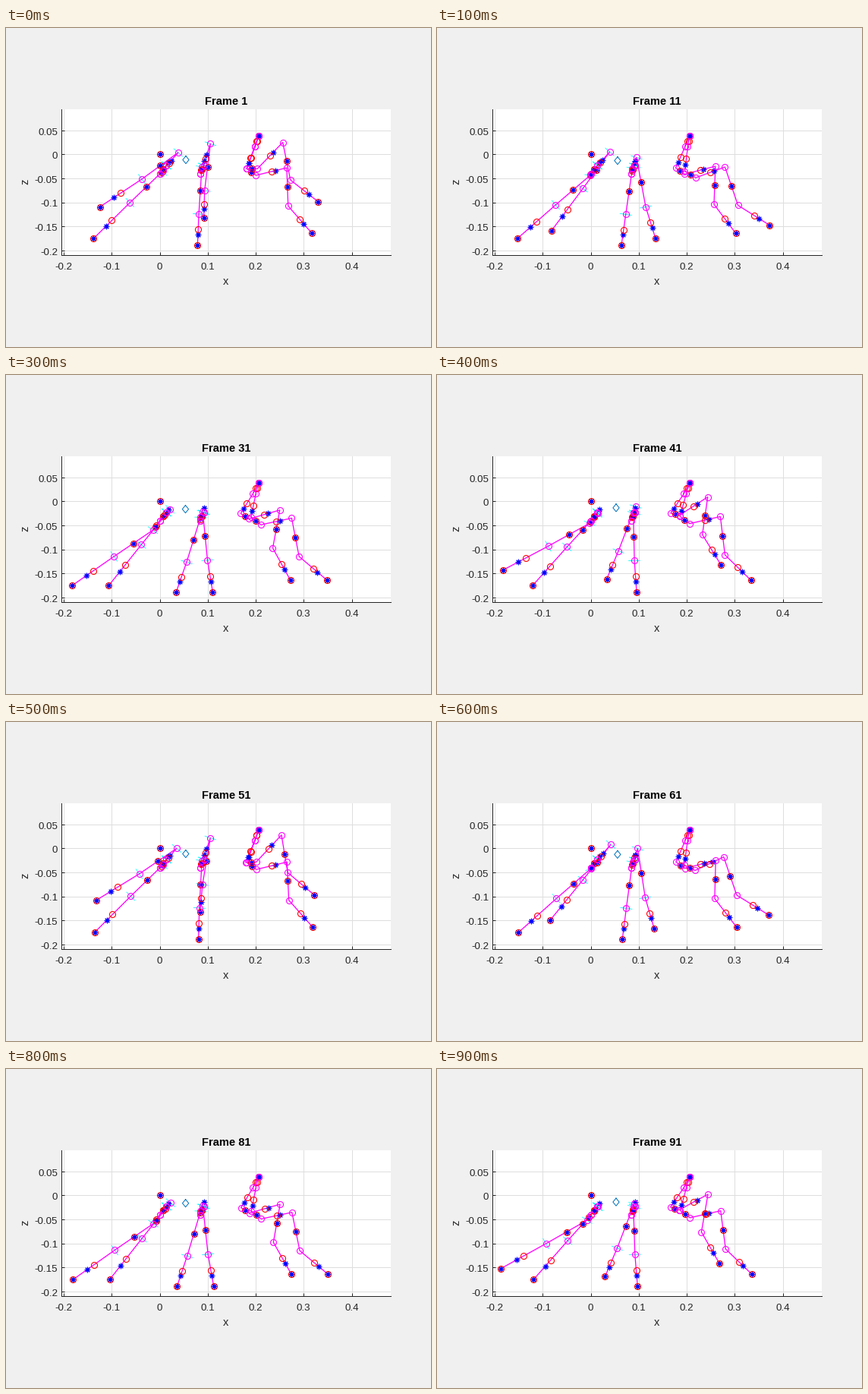
Recreate the animation shown at these times as a matplotlib script. Size 560 by 420 pixels, loop 1 s.

```python
import matplotlib.pyplot as plt
import numpy as np
from matplotlib.animation import FuncAnimation

plt.rcParams["font.family"] = "Liberation Sans"

WIDTH, HEIGHT, FRAMES = 560, 420, 10
INK, MAGENTA = "#262626", "#ff00ff"
LEFT, RIGHT, TOP, BOTTOM = 72.5, 506.5, 106.5, 298.5
ZERO_X, ZERO_Y, SCALE = 202.5, 166.4, 0.6325  # pixels, pixels per millimetre

# Gait: times in samples, lengths in millimetres
PERIOD, LIFT_OFF, SWING_TIME = 10.26, 3.56, 2.79
STRIDE, LIFT = 111, 67


def joint(x, z, sway=(0, 0), lift=(0, 0)):
    """Rest position, and how far the joint follows the foot's sway and lift."""
    return np.array([(x, z), sway, lift], float)


HIND = [
    joint(14, -23),
    joint(0, -40),
    joint(8, -33, (0.47, 0.57), (0.39, 0.47)),
    joint(-60, -99.5, (0.745, 0.32), (0.23, 0.68)),
    joint(-135, -175, (1, 0), (0, 1)),
]
MIDDLE = [
    joint(92, -23),
    joint(85, -40),
    joint(88, -26, (0.06, 0.15), (0.26, 0.71)),
    joint(83, -124, (0.57, 0.05), (0.07, 0.73)),
    joint(81.5, -189, (1, 0), (0, 0.86)),
]
FRONT = [
    joint(206, 38),
    joint(198, 16, (0.08, 0)),
    joint(182, -30, (0.28, -0.1), (-0.06, 0.02)),
    joint(201.5, -44, (0.325, -0.16), (-0.02, 0.24)),
    joint(265.5, -28.5, (0.325, -0.22), (-0.19, 0.85)),
    joint(269.5, -108, (0.72, -0.23), (-0.07, 0.87)),
    joint(319.5, -164, (1, 0), (0, 1)),
]
# Each leg type: joints, position of the mass on every link, joints with ticks
LEGS = [
    (HIND, (0.5, 0.62, 0.5, 0.66), (0, 2, 3)),
    (MIDDLE, (0.5, 0.62, 0.5, 0.66), (0, 2, 3)),
    (FRONT, (0, 0.75, 0.5, 0.62, 0.5, 0.66), ()),
]
ORIGIN = (0, 0)
BODY_MASSES = [(18, -17), (93, -14)]
GAP = (np.nan, np.nan)


def foot_motion(time):
    """Sway and lift of a foot: smooth swing forward, steady push back."""
    t = (time - LIFT_OFF) % PERIOD
    if t < SWING_TIME:
        t /= SWING_TIME
        return STRIDE * (t * t * (3 - 2 * t) - 0.5), LIFT * np.sin(np.pi * t)
    t = (t - SWING_TIME) / (PERIOD - SWING_TIME)
    return STRIDE * (0.5 - t), 0


def tick(here, neighbour, reach=12):
    dx, dz = here - neighbour
    normal = np.array([-dz, dx]) / np.hypot(dx, dz) * reach
    return [here - normal, here + normal, GAP]


def label(x, y, text, size=14.67, **style):
    """Text on a baseline given in pixels from the top left."""
    return fig.text(x / WIDTH, 1 - y / HEIGHT, text, size=size,
                    **{"color": INK, "ha": "center", **style})


fig = plt.figure(figsize=(WIDTH / 72, HEIGHT / 72), dpi=72, facecolor="#f0f0f0")
ax = fig.add_axes([LEFT / WIDTH, 1 - BOTTOM / HEIGHT,
                   (RIGHT - LEFT) / WIDTH, (BOTTOM - TOP) / HEIGHT])
ax.set_xlim((LEFT - ZERO_X) / SCALE, (RIGHT - ZERO_X) / SCALE)
ax.set_ylim((ZERO_Y - BOTTOM) / SCALE, (ZERO_Y - TOP) / SCALE)
ax.set_xticks(range(-200, 401, 100), labels=[])
ax.set_yticks(range(-200, 51, 50), labels=[])
ax.tick_params(direction="in", length=4.3, width=1, color=INK)
ax.grid(color="#dedede", lw=1)
ax.set_axisbelow(True)
ax.spines[["top", "right"]].set_visible(False)
for side in ("left", "bottom"):
    ax.spines[side].set(color=INK, linewidth=1)

for x in ax.get_xticks():
    label(ZERO_X + SCALE * x, 318, f"{x / 1000:g}", 13.33)
for z in ax.get_yticks():
    label(68.3, ZERO_Y - SCALE * z + 5.8, f"{z / 1000:g}", 13.33, ha="right")
label(290, 338, "x")
label(25.5, 202.5, "z", rotation=90, va="center")
title = label(290, 101, "", weight="bold", color="black")


def markers(shape, color, z, size=8):
    return ax.plot([], [], ls="", marker=shape, ms=size, mfc="none",
                   mec=color, mew=1.1, zorder=z)[0]


def line(color, width, z):
    return ax.plot([], [], color=color, lw=width, zorder=z)[0]


ticks = line("cyan", 0.8, 2)
links = line(MAGENTA, 1.3, 3)
masses = markers((8, 2, 0), "blue", 4, 7.5)
centers = markers("o", "red", 5)
joints = markers("o", MAGENTA, 6)
diamond = line("#0072bd", 1, 4)


def put(artist, points):
    artist.set_data(*np.array(points, float).T)


def update(i):
    tick_pts, link_pts, joint_pts = [], [], []
    center_pts, mass_pts = [ORIGIN, FRONT[0][0]], [ORIGIN, *BODY_MASSES]
    for leg, balance, ticked in LEGS:
        for delay in (0, PERIOD / 2):
            chain = list(np.array([1, *foot_motion(i + delay)]) @ np.array(leg))
            link_pts += chain + [GAP]
            joint_pts += chain[:-1]
            for a, b, share in zip(chain, chain[1:], balance):
                center_pts.append((a + b) / 2)
                mass_pts.append(a + share * (b - a))
            center_pts.append(chain[-1])
            mass_pts.append(chain[-1])
            for j in ticked:
                tick_pts += tick(chain[j], chain[j - 1] if j else chain[1])
    put(ticks, tick_pts)
    put(links, link_pts)
    put(masses, mass_pts)
    put(centers, center_pts)
    put(joints, joint_pts)
    # The body bobs twice per stride
    angle = 4 * np.pi * i / PERIOD
    x, z = 54.5 + 1.6 * np.sin(angle), -13.9 + 2.6 * np.cos(angle)
    put(diamond, [(x, z + 8), (x + 6.5, z), (x, z - 8), (x - 6.5, z), (x, z + 8)])
    title.set_text(f"Frame {10 * i + 1}")
    return ticks, links, masses, centers, joints, diamond, title


anim = FuncAnimation(fig, update, frames=FRAMES, interval=100, repeat=True,
                     repeat_delay=0, blit=False)
plt.show()
```
